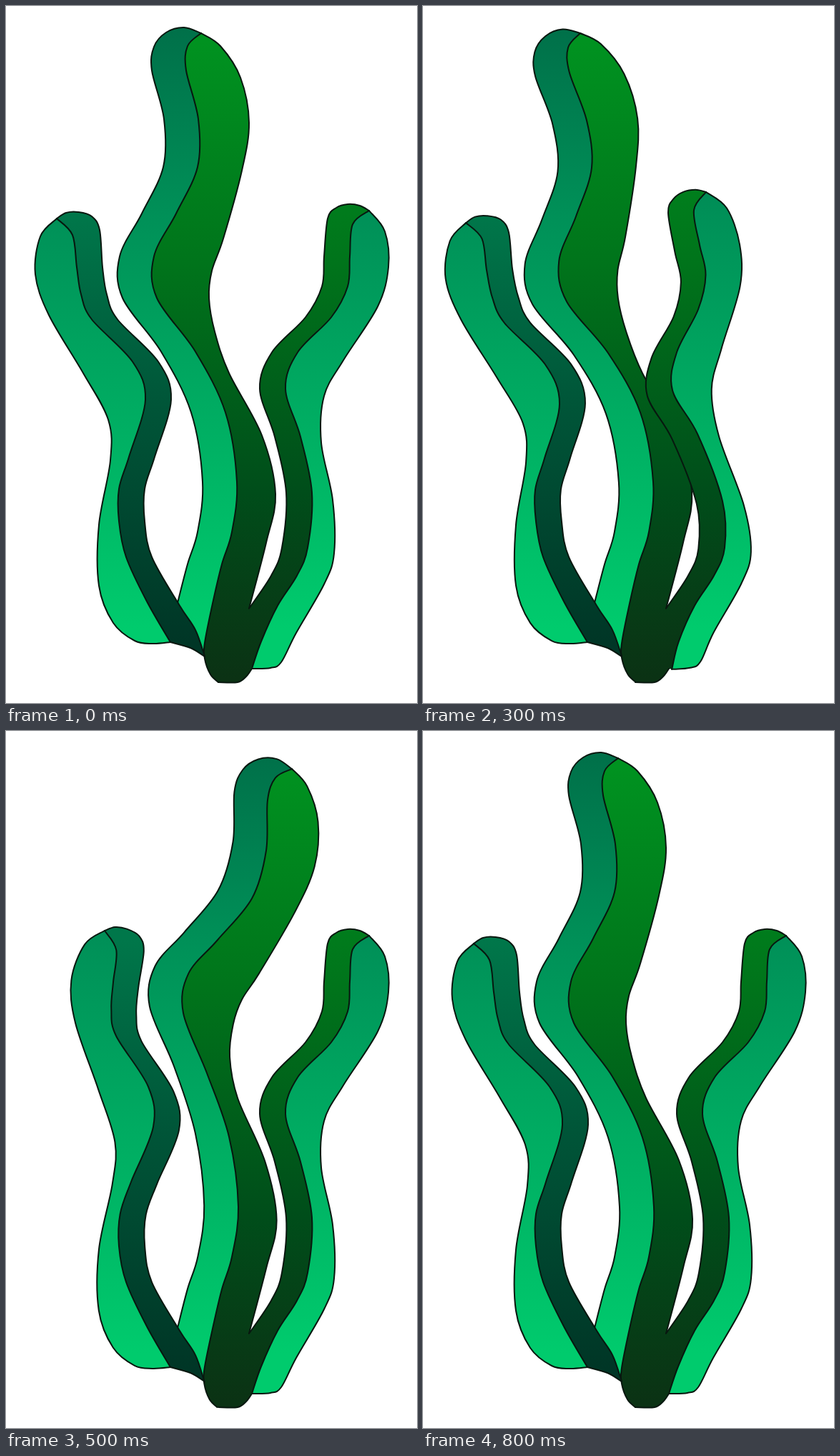
Write an HTML page with a canvas that moves like this. It is 575 by 974 pixels and loops after 0.9 s.

```html
<!DOCTYPE html>
<html lang="en">
<head>
<meta charset="utf-8">
<title>Swaying seaweed</title>
<style>
html, body { margin: 0; width: 100%; height: 100%; overflow: hidden; background: #fff; }
canvas { display: block; width: 100%; height: 100%; }
</style>
</head>
<body>
<canvas id="stage" width="575" height="974"></canvas>
<script>
const ctx = document.getElementById('stage').getContext('2d');

const points = text => text.split(' ').map(pair => pair.split(',').map(Number));

function gradient(...stops) {
  const fill = ctx.createLinearGradient(0, 0, 0, 974);
  stops.forEach(([y, color]) => fill.addColorStop(y / 974, color));
  return fill;
}

const mint = gradient([30, '#007049'], [300, '#009158'], [870, '#00cb6d']);
const leaf = gradient([50, '#009220'], [350, '#00751b'], [680, '#004d1a'], [940, '#0b3214']);
const pine = gradient([290, '#00774a'], [560, '#005538'], [890, '#003626']);

// A blade is drawn once at rest: a divider, a wide edge, and a narrow edge that
// repeats the divider at a fixed distance. Pins along the divider bend it.
const blades = [
  {
    divider: '273,38 254,56 252,90 269,158 268,225 238,290 207,350 211,408 265,483 307,568 323,665 316,735 302,780 289,835 278,890 278,912 286,934 297,945',
    wideEdge: '273,38 300,56 328,100 340,163 330,230 304,325 288,370 284,408 292,455 312,513 358,600 377,682 364,750 340,842',
    cap: '273,38 249,30 224,37 207,57', narrowWidth: -48, narrowEnd: '240,834',
    narrowHem: '240,834 278,908', wideHem: '297,945 324,945 336,937 344,926',
    narrowFill: mint, wideFill: leaf, outlined: '297,945 324,945 336,937 344,926',
    roots: '318,735 302,780 285,860 340,842', overshoot: 1.8,
    pins: {
      rest: '273,38 269,158 238,290 211,408 265,483 307,568 323,665',
      left: '220,38 229,160 214,294 201,413 259,485 304,568 322,665',
      right: '400,53 364,167 296,292 248,394 281,478 312,567 325,665',
      farRight: '483,74 444,183 384,299 313,392 319,482 329,573 329,665'
    }
  },
  {
    divider: '71,297 93,320 99,365 105,403 120,438 177,497 195,550 172,630 158,675 158,720 168,770 197,832 230,889',
    wideEdge: '71,297 48,322 41,375 60,432 108,513 143,578 146,635 130,725 130,810 150,862 180,887 205,891 230,889',
    cap: '71,297 84,289 101,288 120,294 131,313', narrowWidth: 36, narrowEnd: '243,838 265,872 278,909',
    narrowHem: '278,909 258,897 230,889', wideHem: '230,889',
    narrowFill: pine, wideFill: mint, outlined: '278,909 258,897 230,889',
    roots: '158,720 168,770 197,832 230,889', overshoot: 2,
    pins: {
      rest: '71,297 99,365 120,438 177,497 195,550 172,630',
      left: '60,303 89,369 114,443 171,501 191,556 170,632',
      right: '138,279 150,351 154,426 199,497 206,553 175,630',
      farRight: '240,290 220,359 204,431 232,508 224,562 177,631'
    }
  },
  {
    divider: '508,286 485,305 481,350 478,392 455,435 408,484 391,535 412,602 428,680 422,757 407,796 380,838 357,888 344,926',
    wideEdge: '508,286 530,315 535,365 520,420 472,495 445,545 441,610 457,690 459,765 445,808 406,876 385,917 370,925 344,926',
    cap: '508,286 495,279 478,277 462,282 450,297', narrowWidth: -36, narrowEnd: '340,842',
    narrowHem: '340,842 330,890 344,926', wideHem: '344,926',
    narrowFill: leaf, wideFill: mint, outlined: '344,926',
    roots: '422,757 407,796 340,842 375,850', overshoot: 1.3,
    pins: {
      rest: '508,286 481,350 455,435 408,484 391,535 412,602 428,680',
      left: '396,260 387,334 385,424 355,484 349,537 384,598 419,692',
      right: '508,286 481,350 455,435 408,484 391,535 412,602 428,680',
      farRight: '535,294 503,356 470,438 422,486 400,534 416,601 428,680'
    }
  }
];

function pinsFor({ pins, roots, overshoot }, pose) {
  const rest = points(pins.rest), left = points(pins.left);
  const moved = pose === 'farLeft'
    ? rest.map((p, i) => p.map((v, axis) => v + overshoot * (left[i][axis] - v)))
    : points(pins[pose]);
  return { from: rest.concat(points(roots)), to: moved.concat(points(roots)) };
}

// Rigid moving least squares: each point turns and shifts with the pins near it.
function warp([x, y], { from, to }) {
  const weights = from.map(([px, py]) => 1 / (((px - x) ** 2 + (py - y) ** 2) ** 2 + 1e-6));
  const total = weights.reduce((sum, w) => sum + w);
  const centre = (pins, axis) => pins.reduce((sum, p, i) => sum + weights[i] * p[axis], 0) / total;
  const fx = centre(from, 0), fy = centre(from, 1), tx = centre(to, 0), ty = centre(to, 1);
  let cos = 0, sin = 0;
  from.forEach(([px, py], i) => {
    const ax = px - fx, ay = py - fy, bx = to[i][0] - tx, by = to[i][1] - ty;
    cos += weights[i] * (ax * bx + ay * by);
    sin += weights[i] * (ax * by - ay * bx);
  });
  const size = Math.hypot(cos, sin) || 1;
  const dx = x - fx, dy = y - fy;
  return [tx + (dx * cos - dy * sin) / size, ty + (dx * sin + dy * cos) / size];
}

// Add a smooth curve through the points to the current path.
function trace(curve) {
  ctx.lineTo(...curve[0]);
  for (let i = 0; i < curve.length - 1; i++) {
    const a = curve[i], b = curve[i + 1];
    const before = curve[i - 1] || a, after = curve[i + 2] || b;
    ctx.bezierCurveTo(
      a[0] + (b[0] - before[0]) / 6, a[1] + (b[1] - before[1]) / 6,
      b[0] - (after[0] - a[0]) / 6, b[1] - (after[1] - a[1]) / 6,
      b[0], b[1]);
  }
}

function fillBetween(edge, hem, divider, color) {
  ctx.beginPath();
  [edge, hem, [...divider].reverse()].forEach(trace);
  ctx.fillStyle = color;
  ctx.fill();
}

function drawBlade(blade, pose) {
  const pins = pinsFor(blade, pose);
  const bend = curve => curve.map(p => warp(p, pins));
  const restDivider = points(blade.divider);
  const shifted = restDivider.slice(2).filter(([, y]) => y < 800).map(([x, y]) => [x + blade.narrowWidth, y]);

  const divider = bend(restDivider);
  const wide = bend(points(blade.wideEdge));
  const narrow = bend([...points(blade.cap), ...shifted, ...points(blade.narrowEnd)]);

  fillBetween(narrow, points(blade.narrowHem), divider, blade.narrowFill);
  fillBetween(wide, points(blade.wideHem).reverse(), divider, blade.wideFill);
  [narrow, divider, wide, points(blade.outlined)].forEach(curve => {
    ctx.beginPath();
    trace(curve);
    ctx.stroke();
  });
}

const sway = ['rest', 'left', 'farLeft', 'left', 'rest', 'right', 'farRight', 'right', 'rest'];
const start = performance.now();

function draw() {
  const step = Math.floor((performance.now() - start) / 100) % sway.length;
  ctx.fillStyle = '#fff';
  ctx.fillRect(0, 0, 575, 974);
  ctx.strokeStyle = '#08170f';
  ctx.lineWidth = 2;
  ctx.lineJoin = ctx.lineCap = 'round';
  blades.forEach(blade => drawBlade(blade, sway[step]));
  requestAnimationFrame(draw);
}
draw();
</script>
</body>
</html>
```
